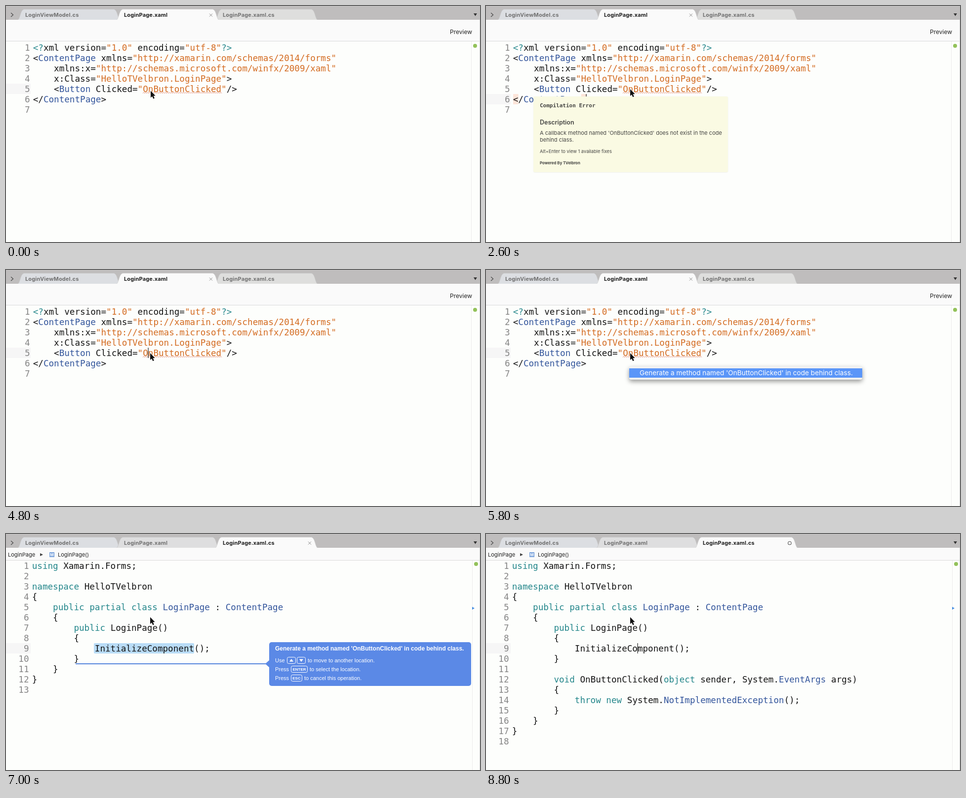
An HTML page with a canvas that plays this animation: 960 px wide and 480 px high, repeating every 9 s.

```html
<!DOCTYPE html>
<html lang="en">
<head>
<meta charset="utf-8">
<title>Generate code-behind method</title>
<style>
html, body { margin: 0; width: 100%; height: 100%; overflow: hidden; background: #fdfefc; }
canvas { display: block; }
</style>
</head>
<body>
<canvas id="stage" width="960" height="480"></canvas>
<script>
const ctx = document.getElementById('stage').getContext('2d');

const LOOP = 9000, STEP = 200;
const CELL = 10.596, ROW = 21;
const MONO = '"DejaVu Sans Mono", monospace';
const UI = 'Inter, sans-serif';
const ARIAL = '"Liberation Sans", Arial, sans-serif';
const CODE_FONT = '17.6px ' + MONO;
const INK = { n: '#141414', k: '#25878b', s: '#d46c22', t: '#34569c' };

// Moments at which the picture changes, in ms
const AT = { rowSix: 600, tipIn: 2200, tipOut: 4600, menuIn: 5400, codeView: 6200, moved: 6600, inserted: 7800 };

// Each line alternates ink key and text
const XAML = [
  'k|<?|n|xml version=|s|"1.0"|n| encoding=|s|"utf-8"|k|?>',
  'n|<|t|ContentPage|n| xmlns=|s|"http://xamarin.com/schemas/2014/forms"',
  'n|    xmlns:x=|s|"http://schemas.microsoft.com/winfx/2009/xaml"',
  'n|    x:Class=|s|"HelloTVelbron.LoginPage"|n|>',
  'n|    <|t|Button|n| Clicked=|s|"OnButtonClicked"|n|/>',
  'n|</|t|ContentPage|n|>',
  ''
];
const CLASS_TOP = [
  'k|using|n| Xamarin.Forms;',
  '',
  'k|namespace|n| HelloTVelbron',
  'n|{',
  'k|    public partial class |t|LoginPage|n| : |t|ContentPage',
  'n|    {',
  'k|        public|n| LoginPage()',
  'n|        {',
  'n|            InitializeComponent();',
  'n|        }'
];
const METHOD = [
  '',
  'k|        void|n| OnButtonClicked(|k|object|n| sender, System.|t|EventArgs|n| args)',
  'n|        {',
  'k|            throw new|n| System.|t|NotImplementedException|n|();',
  'n|        }'
];
const CLASS_END = ['n|    }', 'n|}', ''];

const XAML_VIEW = { x: 54.7, top: 74, numberX: 48.5 };
const CODE_VIEW = { x: 52.7, top: 54, numberX: 46.5 };

function rect(x, y, w, h, color) {
  ctx.fillStyle = color;
  ctx.fillRect(x, y, w, h);
}

function round(x, y, w, h, r) {
  ctx.beginPath();
  ctx.roundRect(x, y, w, h, r);
}

function text(str, x, y, font, color, align = 'left') {
  ctx.font = font;
  ctx.fillStyle = color;
  ctx.textAlign = align;
  ctx.fillText(str, x, y);
}

function polygon(points, color) {
  ctx.beginPath();
  points.forEach(([x, y]) => ctx.lineTo(x, y));
  ctx.closePath();
  ctx.fillStyle = color;
  ctx.fill();
}

function stroke(points, color, width) {
  ctx.beginPath();
  points.forEach(([x, y], i) => i ? ctx.lineTo(x, y) : ctx.moveTo(x, y));
  ctx.strokeStyle = color;
  ctx.lineWidth = width;
  ctx.stroke();
}

function disc(x, y, r, color) {
  ctx.beginPath();
  ctx.arc(x, y, r, 0, Math.PI * 2);
  ctx.fillStyle = color;
  ctx.fill();
}

function shadowed(blur, dy, color, draw) {
  ctx.save();
  ctx.shadowBlur = blur;
  ctx.shadowOffsetY = dy;
  ctx.shadowColor = color;
  draw();
  ctx.restore();
}

function drawTab(index, label, active) {
  const x = 24 + 200 * index;
  ctx.beginPath();
  ctx.moveTo(x, 28.5);
  ctx.bezierCurveTo(x + 5, 25, x + 5, 7, x + 13, 6.5);
  ctx.lineTo(x + 194, 6.5);
  ctx.bezierCurveTo(x + 202, 7, x + 202, 25, x + 207, 28.5);
  ctx.fillStyle = active ? '#fafafa' : ['#dcdee2', '#dededf', '#dededd'][index];
  ctx.fill();
  ctx.strokeStyle = active ? '#cfcfcf' : '#c4c4c4';
  ctx.lineWidth = 0.8;
  ctx.stroke();
  ctx.letterSpacing = '0.15px';
  text(label, x + 15, 22, 'bold 11px ' + UI, active ? '#1c1c1c' : '#707070');
  ctx.letterSpacing = '0px';
}

function drawChrome(activeTab, modified) {
  rect(0, 0, 960, 480, '#fdfefc');
  rect(0, 0, 960, 28, '#bfbdbd');
  rect(0, 0, 960, 1, '#c9c8c8');
  const labels = ['LoginViewModel.cs', 'LoginPage.xaml', 'LoginPage.xaml.cs'];
  [0, 2, 1].forEach(i => { if (i !== activeTab) drawTab(i, labels[i], false); });
  drawTab(activeTab, labels[activeTab], true);

  const cx = 215 + 200 * activeTab;
  if (modified) {
    ctx.beginPath();
    ctx.arc(cx, 18.5, 3.3, 0, Math.PI * 2);
    ctx.strokeStyle = '#555';
    ctx.lineWidth = 1.1;
    ctx.stroke();
  } else {
    stroke([[cx - 3, 15.5], [cx + 3, 21.5]], '#8a8a8a', 1);
    stroke([[cx + 3, 15.5], [cx - 3, 21.5]], '#8a8a8a', 1);
  }
  stroke([[10, 14], [14.5, 18], [10, 22]], '#4a4a4a', 1.2);
  polygon([[947, 15], [954, 15], [950.5, 20.5]], '#333');

  const bottom = activeTab === 1 ? 71 : 53;
  rect(0, 28, 960, bottom - 28, '#fafafa');
  rect(0, bottom, 960, 1, '#dadada');
  const rail = activeTab === 1 ? 942 : 944;
  rect(rail, bottom + 1, 1, 480, '#ececec');
  rect(959, 28, 1, 452, '#d9d9d9');
}

function drawLines(lines, view) {
  lines.forEach((line, i) => {
    const y = view.top + 17 + ROW * i;
    text(i + 1, view.numberX, y, CODE_FONT, '#868686', 'right');
    const parts = line.split('|');
    let column = 0;
    for (let p = 0; p + 1 < parts.length; p += 2) {
      text(parts[p + 1], view.x + column * CELL, y, CODE_FONT, INK[parts[p]]);
      column += parts[p + 1].length;
    }
  });
}

const rowTop = (view, row) => view.top + ROW * (row - 1);

function markRow(view, row) {
  rect(0, rowTop(view, row), 50, ROW, '#f6f6f6');
}

function drawCaret(view, row, column) {
  rect(Math.round(view.x + column * CELL) - 0.5, rowTop(view, row), 1.2, ROW, '#222');
}

function drawSquiggle() {
  const points = [];
  for (let x = 277; x <= 437; x += 2) points.push([x, x % 4 === 1 ? 177.7 : 175.5]);
  stroke(points, '#e08c76', 0.9);
}

function drawTooltip() {
  shadowed(2, 0.5, 'rgba(0,0,0,.08)', () => {
    round(96, 184, 394, 154, 3);
    ctx.fillStyle = '#fafae3';
    ctx.fill();
  });
  const color = '#454543';
  text('Compilation Error', 109, 206, 'bold 11px ' + MONO, color);
  text('Description', 109, 240.5, '600 12.5px ' + UI, color);
  text("A callback method named 'OnButtonClicked' does not exist in the code", 109, 262, '11px ' + UI, color);
  text('behind class.', 109, 276, '11px ' + UI, color);
  text('Alt+Enter to view 1 available fixes', 109, 299, '9.3px ' + UI, color);
  text('Powered By TVelbron', 109, 321.5, 'bold 7.8px ' + UI, color);
}

const FIX = "Generate a method named 'OnButtonClicked' in code behind class.";

function drawMenu() {
  shadowed(10, 4, 'rgba(0,0,0,.4)', () => {
    round(290, 196, 472, 27, 4);
    ctx.fillStyle = '#f2f2f2';
    ctx.fill();
  });
  rect(290, 200, 472, 19, '#5b96f8');
  text(FIX, 311, 214, '13.65px ' + UI, '#fff');
}

function drawKey(x, y, w, label) {
  round(x + 0.5, y + 0.5, w - 1, 13, 3);
  ctx.strokeStyle = '#fff';
  ctx.lineWidth = 1;
  ctx.stroke();
  if (label) text(label, x + w / 2, y + 10, 'bold 8px ' + ARIAL, '#fff', 'center');
}

function drawCallout(y) {
  const blue = '#5b89e6', small = '11px ' + ARIAL;
  rect(141, y - 1, 386, 2, '#5585dc');
  round(533, y - 44, 409, 89, 5);
  ctx.fillStyle = blue;
  ctx.fill();
  polygon([[525, y], [534, y - 8], [534, y + 8]], blue);
  text(FIX, 545, y - 27, 'bold 12px ' + ARIAL, '#fff');

  text('Use', 545, y - 3, small, '#fff');
  drawKey(569, y - 14, 18);
  drawKey(589, y - 14, 18);
  polygon([[574, y - 4.5], [582, y - 4.5], [578, y - 10]], '#fff');
  polygon([[594, y - 9.5], [602, y - 9.5], [598, y - 4]], '#fff');
  text('to move to another location.', 611, y - 3, small, '#fff');

  text('Press', 545, y + 15, small, '#fff');
  drawKey(577, y + 4, 34, 'ENTER');
  text('to select the location.', 615, y + 15, small, '#fff');

  text('Press', 545, y + 33, small, '#fff');
  drawKey(577, y + 22, 23, 'ESC');
  text('to cancel this operation.', 604, y + 33, small, '#fff');
}

function drawPointer(x, y) {
  const outline = [[0, 0], [0, 14], [3.1, 11.2], [5.4, 16.2], [7.9, 15.1], [5.6, 10.2], [9.6, 10]]
    .map(([px, py]) => [x + px, y + py]);
  ctx.lineJoin = 'round';
  stroke([...outline, outline[0]], '#fff', 1.6);
  polygon(outline, '#111');
  ctx.lineJoin = 'miter';
}

function ease(t, from, to) {
  const u = Math.min(1, Math.max(0, (t - from) / (to - from)));
  return u * u * (3 - 2 * u);
}

function drawXamlView(t, caretOn) {
  const onRowSix = t >= AT.rowSix && t < AT.tipOut;
  drawChrome(1, false);
  text('Preview', 899, 57, '12px ' + UI, '#222');
  disc(950, 81, 4, '#93c25a');
  markRow(XAML_VIEW, onRowSix ? 6 : 5);
  if (onRowSix) [0, 13].forEach(c => rect(55 + c * CELL, 179, CELL, ROW, '#fde5d9'));
  drawLines(XAML, XAML_VIEW);
  drawSquiggle();
  if (caretOn && onRowSix) drawCaret(XAML_VIEW, 6, 14);
  if (caretOn && t >= AT.tipOut) drawCaret(XAML_VIEW, 5, 22);
  if (t >= AT.tipIn && t < AT.tipOut) drawTooltip();
  if (t >= AT.menuIn) drawMenu();
}

function drawCodeView(t, caretOn) {
  const inserted = t >= AT.inserted;
  drawChrome(2, inserted);
  text('LoginPage', 4, 46, '11px ' + UI, '#222');
  polygon([[69, 39], [75, 42], [69, 45]], '#444');
  rect(88, 37, 10, 10, '#7ba3dc');
  text('M', 93, 45, 'bold 8px ' + UI, '#fff', 'center');
  text('LoginPage()', 105, 46, '11px ' + UI, '#222');
  disc(952, 61, 4, '#93c25a');
  polygon([[944, 148], [949, 151], [944, 154]], '#4a90e2');

  markRow(CODE_VIEW, 9);
  if (!inserted) {
    round(178, 222, 203, ROW, 2);
    ctx.fillStyle = '#b9dcf7';
    ctx.fill();
  }
  drawLines([...CLASS_TOP, ...(inserted ? METHOD : []), ...CLASS_END], CODE_VIEW);
  if (!inserted) drawCallout(t < AT.moved ? 180 : 264);
  else if (caretOn) drawCaret(CODE_VIEW, 9, 24);
}

function frame(now) {
  const t = Math.floor((now % LOOP) / STEP) * STEP;
  const caretOn = t % 1200 < 600;
  if (t < AT.codeView) drawXamlView(t, caretOn);
  else drawCodeView(t, caretOn);

  const down = ease(t, 0, 600), back = ease(t, 600, 1200);
  drawPointer(293 - back, 172.5 + 17 * down - 20.5 * back);
  requestAnimationFrame(frame);
}
requestAnimationFrame(frame);
</script>
</body>
</html>
```
